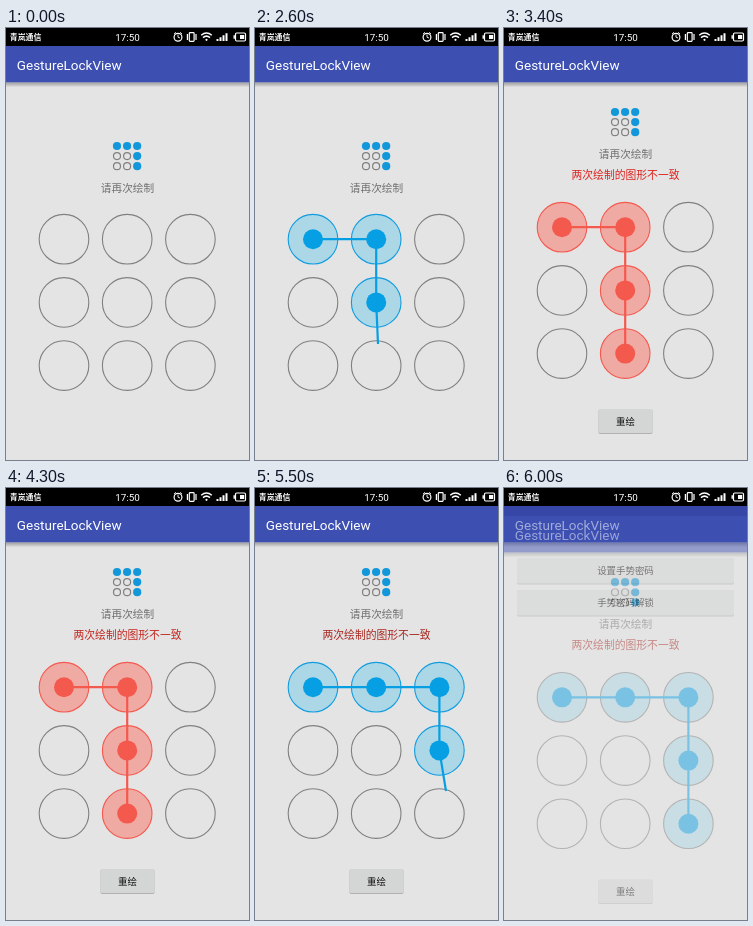
Write an HTML page that moves like this. It is 243x432 px and loops after 6.1 s.

```html
<!DOCTYPE html>
<html lang="zh-CN">
<head>
<meta charset="utf-8">
<title>GestureLockView</title>
<style>
  html, body { margin: 0; height: 100%; overflow: hidden; background: #000; }
  svg { display: block; width: 100vw; height: 100vh; }
  text { font-family: Roboto, "Noto Sans CJK SC", "Noto Sans CJK", sans-serif; }
  .mid { text-anchor: middle; }
  .title { font-size: 13.5px; fill: #fff; }
  .button { font-size: 9.45px; font-weight: 500; fill: #111; }
  .prompt { font-size: 10.7px; fill: #707070; }
  .status { fill: #fff; }
</style>
</head>
<body>
<svg viewBox="0 0 243 432">
  <defs>
    <linearGradient id="shade" x2="0" y2="1">
      <stop stop-color="#000" stop-opacity=".32"/>
      <stop offset="1" stop-color="#000" stop-opacity="0"/>
    </linearGradient>
  </defs>
  <g id="home"></g>
  <g id="lock"></g>
  <rect width="243" height="18"/>
  <g class="status">
    <text x="3.8" y="11.5" font-size="7.9" font-weight="700">青岚通信</text>
    <text class="mid" x="121.5" y="12.5" font-size="9.9">17:50</text>
  </g>
  <g fill="none" stroke="#fff" stroke-width="1.2">
    <path d="M172 6.5V9.2L174 10M168 6L170 4.3M176 6L174 4.3" stroke-width=".9"/>
    <circle cx="172" cy="9.2" r="3.9"/>
    <rect x="183.3" y="4.6" width="4.8" height="8.8" rx=".8"/>
    <path d="M181.4 6V12M190 6V12"/>
    <path d="M195.2 7.3Q200.5 2.8 205.8 7.3M197 9.6Q200.5 6.6 204 9.6" stroke-width="1.5"/>
    <circle cx="200.5" cy="11.8" r="1.1" fill="#fff" stroke="none"/>
    <path d="M211.5 13V11M214.5 13V9.3M217.5 13V7.3M220.5 13V5.3" stroke-width="2"/>
    <rect x="229.5" y="5" width="10" height="8" rx="1.2"/>
    <path d="M228.2 7.3V10.7" stroke-width="1.4"/>
    <path d="M234 9H238.2" stroke-width="4"/>
  </g>
</svg>
<script>
const LOOP = 6100, STEP = 100;
const GRAY = '#808080';
const BLUE = { fill: '#abd7e6', line: '#069fe3', rim: '#109cdf' };
const RED = { fill: '#efaaa4', line: '#f4594e', rim: '#f4594e' };
const DONE = { ...BLUE, rim: GRAY };

// nodes: [index, time touched]; finger: [time, x, y]
const first = {
  end: 2900,
  nodes: [[0, 1600], [1, 1880], [4, 2360], [7, 2650]],
  finger: [[1600, 58, 211], [2000, 121, 212], [2200, 122, 216], [2600, 123, 316], [2800, 121, 338]]
};
const second = {
  end: 5700,
  nodes: [[0, 4800], [1, 4950], [2, 5150], [5, 5330], [8, 5550]],
  finger: [[4800, 58, 199], [5200, 180, 200], [5500, 191, 303], [5650, 185, 325]]
};

const home = document.getElementById('home');
const lock = document.getElementById('lock');
const clamp = v => Math.max(0, Math.min(1, v));
const cells = draw => [...Array(9).keys()].map(i => draw(i, i % 3, Math.floor(i / 3))).join('');

function fingerAt(points, t) {
  const next = points.findIndex(p => p[0] > t);
  if (next < 0) return points.at(-1).slice(1);
  const [t0, x0, y0] = points[next - 1], [t1, x1, y1] = points[next];
  const k = (t - t0) / (t1 - t0);
  return [x0 + (x1 - x0) * k, y0 + (y1 - y0) * k];
}

const label = (str, x, y, cls, color) =>
  `<text class="${cls}" x="${x}" y="${y}"${color ? ` style="fill:${color}"` : ''}>${str}</text>`;

const button = (str, x, y, w, h) => `
  <rect x="${x}" y="${y + .9}" width="${w}" height="${h}" rx="1.4" fill="#000" opacity=".22"/>
  <rect x="${x}" y="${y}" width="${w}" height="${h}" rx="1.4" fill="#d4d5d5"/>
  ${label(str, 121.5, y + h / 2 + 3.5, 'mid button')}`;

const page = `
  <rect width="243" height="432" fill="#e4e4e4"/>
  <rect y="54.3" width="243" height="5" fill="url(#shade)"/>
  <rect width="243" height="54.3" fill="#3d50b2"/>
  <rect width="243" height="18" fill="#303f9f"/>
  ${label('GestureLockView', 10.8, 41.8, 'title')}`;

const indicator = top => cells((i, col, row) => {
  const on = row === 0 || col === 2;
  return `<circle cx="${111 + col * 10.1}" cy="${top + row * 10.1}" r="${on ? 4.1 : 3.5}"
    fill="${on ? '#1298da' : 'none'}" stroke="${on ? 'none' : GRAY}" stroke-width="1.2"/>`;
});

function grid(t, top, gesture, { fill, line, rim }) {
  const center = i => [58 + i % 3 * 63.2, top + Math.floor(i / 3) * 63.2];
  const touched = gesture.nodes.filter(n => n[1] <= t).map(n => n[0]);
  const path = touched.map(center);
  if (path.length && t < gesture.end) path.push(fingerAt(gesture.finger, t));
  return cells(i => {
    const [x, y] = center(i), on = touched.includes(i);
    return `<circle cx="${x}" cy="${y}" r="24.8" fill="${on ? fill : 'none'}"
      stroke="${on ? rim : GRAY}" stroke-width="1.1"/>` +
      (on ? `<circle cx="${x}" cy="${y}" r="10" fill="${line}"/>` : '');
  }) + `<polyline points="${path.join(' ')}" fill="none" stroke="${line}" stroke-width="2.2"/>`;
}

function mismatch(t) {
  const shake = t < 3400 ? 2 * Math.cos(Math.PI * (t - 2900) / 100) : 0;
  const color = t < 4300 ? '#dd211c' : t < 4800 ? '#c3241c' : '#a8261f';
  return `<g font-size="10.8">${label('两次绘制的图形不一致', 121.5 + shake, 151, 'mid', color)}</g>` +
    button('重绘', 94.5, 381, 54, 24);
}

function render(t) {
  const failed = t >= first.end, retry = t >= 4800;
  const shift = failed ? 34 : 0;
  const style = t >= second.end ? DONE : failed && !retry ? RED : BLUE;
  lock.innerHTML = page + indicator(118 - shift) +
    label('请再次绘制', 121.5, 163.5 - shift, 'mid prompt') +
    grid(t, failed ? 199.2 : 211.2, retry ? second : first, style) +
    (failed ? mismatch(t) : '');

  // closing screen slides down, then fades
  const closing = t - 5822;
  lock.setAttribute('transform', `translate(0 ${34.5 * clamp(closing / 250) ** 3.6})`);
  lock.setAttribute('opacity', 1 - clamp((closing - 100) / 150));
}

home.innerHTML = page + button('设置手势密码', 13, 70, 217, 25.5) + button('手势密码解锁', 13, 102, 217, 25.5);

const start = performance.now();
let shown = -1;
function tick() {
  const t = Math.floor((performance.now() - start) % LOOP / STEP) * STEP;
  if (t !== shown) render(shown = t);
  requestAnimationFrame(tick);
}
tick();
</script>
</body>
</html>
```
